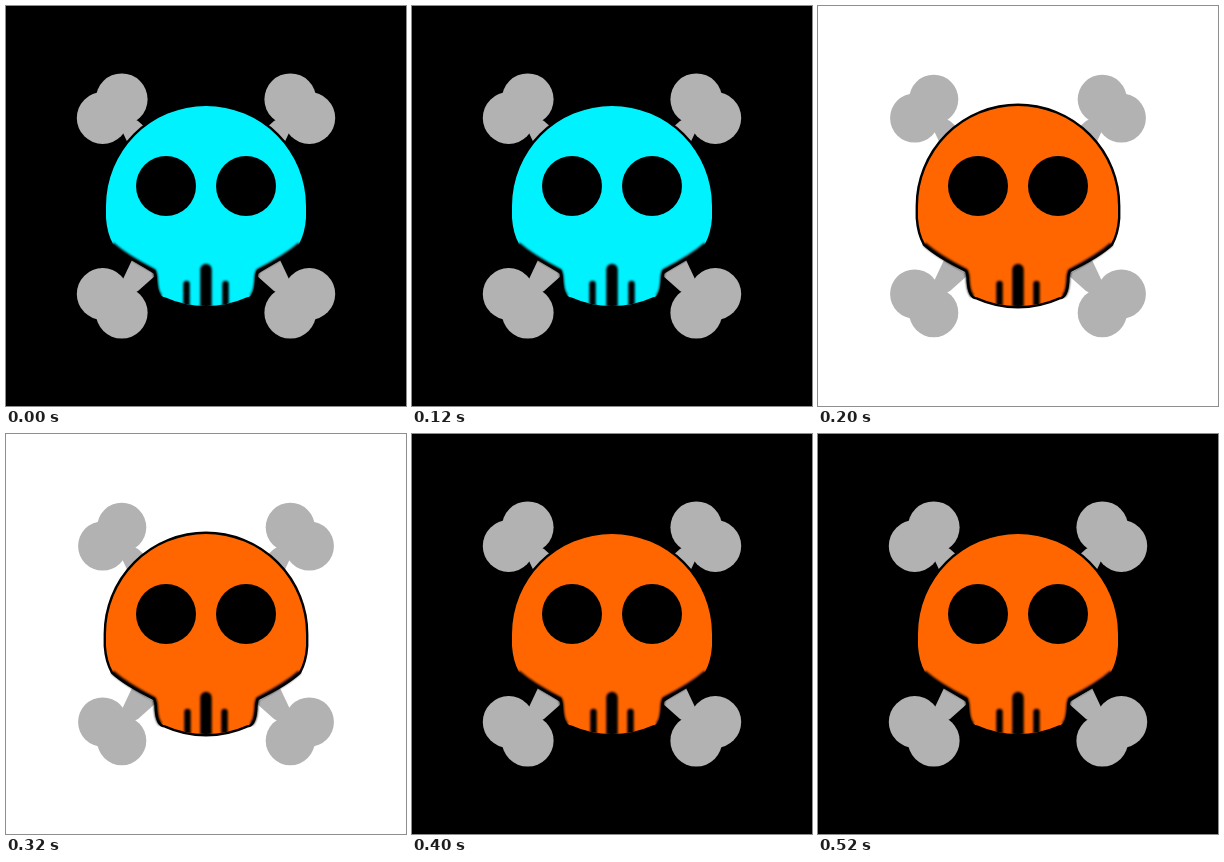
An HTML page that plays this animation: 400 by 400 pixels, repeating every 0.6 s.

```html
<!DOCTYPE html>
<html lang="en">
<head>
<meta charset="utf-8">
<title>Flashing skull</title>
<style>
  html, body { margin: 0; width: 100%; height: 100%; overflow: hidden; background: #000; }
  svg { display: block; width: 100vw; height: 100vh; }
  .soft { filter: blur(.8px); }
</style>
</head>
<body>
<svg viewBox="0 0 400 400">
  <defs>
    <g id="bone">
      <circle class="knob" cx="115.7" cy="93.3"/>
      <circle class="knob" cx="96.7" cy="112"/>
      <path d="M106 102L117.5 128L126 146L150 131L132 115Z"/>
    </g>
    <path id="head" d="M100 200A100 100 0 0 1 300 200V212Q299 227 293 238Q280 250 251 264Q249 268 249 275Q248 291 241 291.2A100 100 0 0 1 159 291.2Q152 291 151 275Q151 268 149 264Q120 250 107 238Q101 227 100 212Z"/>
    <path id="jaw" d="M106.5 238Q120 250 148 264.5Q150 268 150 275Q151 288 155 290"/>
    <clipPath id="mouth"><use href="#head"/></clipPath>
  </defs>
  <rect id="back" width="400" height="400"/>
  <g fill="#b2b2b2">
    <use href="#bone"/>
    <use href="#bone" transform="matrix(-1 0 0 1 400 0)"/>
    <use href="#bone" transform="matrix(1 0 0 -1 0 400)"/>
    <use href="#bone" transform="rotate(180 200 200)"/>
  </g>
  <use href="#head" stroke="#000" stroke-width="4.8"/>
  <use href="#head" id="face"/>
  <circle cx="160" cy="180" r="30"/>
  <circle cx="240" cy="180" r="30"/>
  <g class="soft" fill="none" stroke="#000" stroke-width="3.6">
    <use href="#jaw"/>
    <use href="#jaw" transform="matrix(-1 0 0 1 400 0)"/>
  </g>
  <g clip-path="url(#mouth)">
    <g class="soft" fill="none" stroke="#000" stroke-linecap="round">
      <path d="M200 263.5V310" stroke-width="11.5"/>
      <path id="gaps" stroke-width="6.5"/>
    </g>
  </g>
</svg>
<script>
  const STEP = 200;
  const looks = [
    { back: '#000', face: '#00f2ff', knob: 25.9, gap: 19.5 },
    { back: '#fff', face: '#ff6600', knob: 24.6, gap: 18.5 },
    { back: '#000', face: '#ff6600', knob: 25.9, gap: 18.5 }
  ];
  const get = id => document.getElementById(id);
  const knobs = document.querySelectorAll('.knob');
  const start = performance.now();

  function draw() {
    const time = performance.now() - start;
    const look = looks[Math.floor(time / STEP) % looks.length];
    get('back').setAttribute('fill', look.back);
    get('face').setAttribute('fill', look.face);
    get('gaps').setAttribute('d', `M${200 - look.gap} 278V310M${200 + look.gap} 278V310`);
    knobs.forEach(knob => knob.setAttribute('r', look.knob));
    requestAnimationFrame(draw);
  }
  draw();
</script>
</body>
</html>
```
